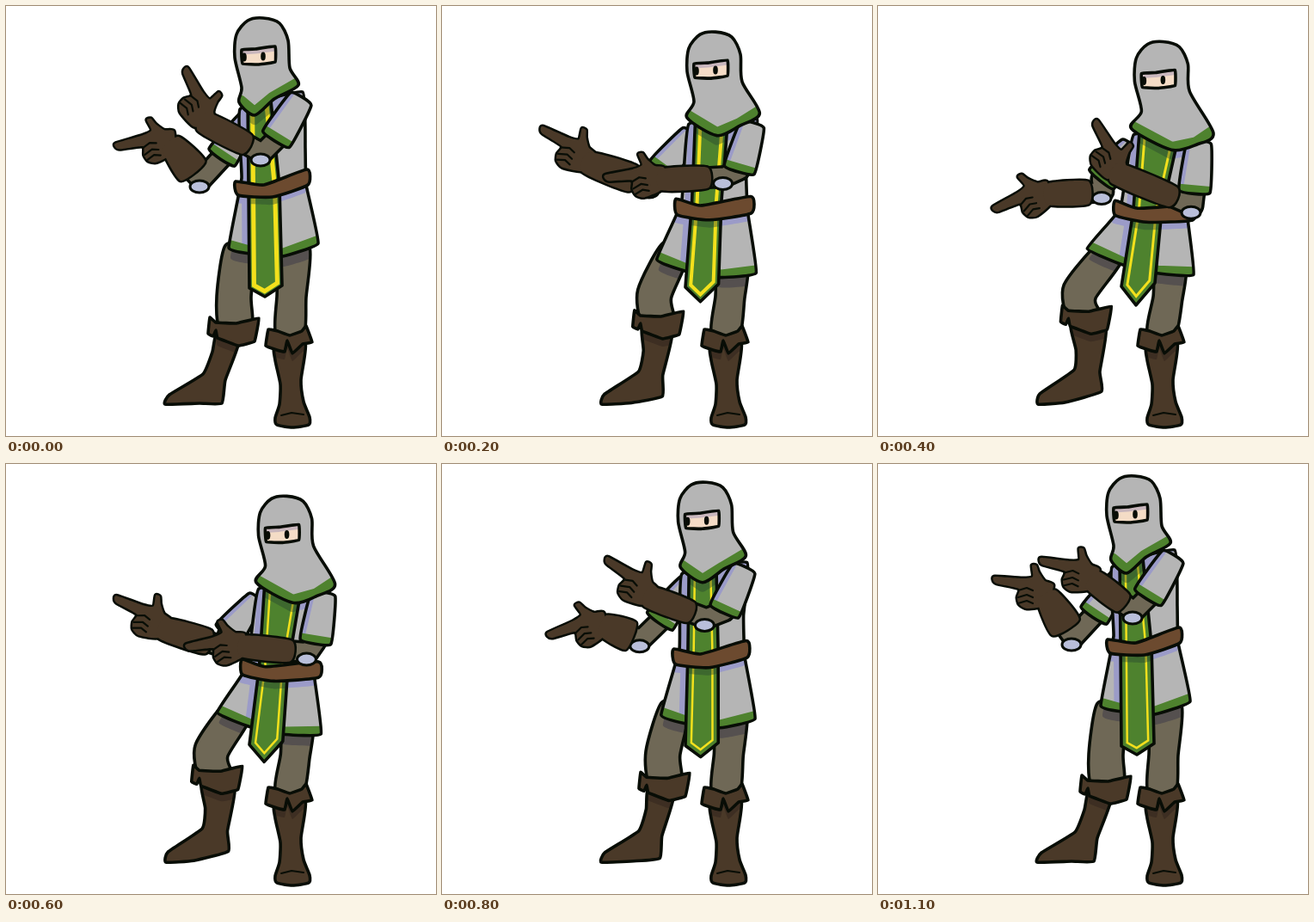
An HTML page with a canvas that plays this animation: 500x500 px, repeating every 1.2 s.

```html
<!DOCTYPE html>
<html lang="en">
<head>
<meta charset="utf-8">
<title>Knight dance</title>
<style>
html, body { margin: 0; width: 100%; height: 100%; overflow: hidden; background: #fff; }
canvas { display: block; width: 100vw; height: 100vh; }
</style>
</head>
<body>
<canvas id="stage" width="500" height="500"></canvas>
<script>
const ctx = document.getElementById('stage').getContext('2d');
const INK = '#080d06', STEEL = '#b5b5b5', LILAC = '#9b9bc8', GREEN = '#4e822e', YELLOW = '#f3e01c',
  LEATHER = '#4a3928', DARK_LEATHER = '#3d2e22', CLOTH = '#6f6856', DARK_CLOTH = '#55504f',
  BELT = '#6c4a2f', PAD = '#b9bfda', SKIN = '#f4dcc6', SHADE = 'rgba(35,65,45,.4)';

const points = text => text.split(' ').map(p => p.split(',').map(Number));
const mix = (a, b, f) => Array.isArray(a) ? a.map((v, i) => mix(v, b[i], f)) : a + (b - a) * f;
const shift = (pts, dx, dy) => pts.map(([x, y]) => [x + dx, y + dy]);

// Each moving part blends between standing and crouching
const pair = (stand, crouch) => {
  const a = points(stand), b = points(crouch);
  return f => mix(a, b, f);
};
const collarAt = pair('340,92 312,108 289,127 271,112', '391,149 372,162 342,168 295,143');
const tunicAt = pair(
  '272,120 274,200 259,281 284,288 322,291 363,276 349,208 348,165 345,100',
  '298,150 282,235 243,281 284,300 325,310 367,312 360,245 358,200 382,155');
const tabardAt = pair('281,108 307,100 318,210 321,325 301,338 283,328 282,210',
  '305,140 352,145 330,240 322,322 300,348 283,326 297,240');
const beltAt = pair('267,204 300,208 350,190 351,208 310,222 270,220',
  '276,226 302,235 366,232 366,249 312,251 276,243');
const bootAt = pair('245,380 240,402 229,428 190,452 185,463 225,462 251,462 255,435 271,390',
  '224,370 230,400 228,423 188,451 186,463 217,461 260,448 258,425 265,374');
const farLegAt = pair('271,280 265,338 267,374', '272,284 234,332 239,360');
const nearLegAt = pair('336,280 332,338 330,382', '341,298 337,340 329,382');
const farSleeveAt = pair('283,128 251,176', '292,162 260,202');
const nearSleeveAt = pair('343,108 314,155', '374,160 369,217');
const padsAt = pair('225,210 296,179', '261,224 366,242');

// Wrist x, y and hand angle on each beat; one step is 100 ms
const beats = [
  { at: 0, far: [188, 161, -20], near: [226, 131, 55] },
  { at: 2, far: [163, 180, 20], near: [250, 203, -15] },
  { at: 4, far: [193, 221, -33], near: [273, 191, 52] },
  { at: 6, far: [177, 190, 16], near: [270, 213, -18] },
  { at: 8, far: [183, 189, -28], near: [235, 152, 25] },
  { at: 9, far: [181, 164, 6], near: [233, 141, -4] },
  { at: 11, far: [192, 153, 0], near: [245, 134, 3] }];

const dome = points('274,95 266,60 268,33 281,17 299,14 318,20 328,40 330,72');
const slot = points('274,51 290,50 313,47 313,65 294,68 275,67');
const handShape = points('12,-12 2,-17 -5,-27 -8,-35 -13,-35 -12,-22 -24,-20 -56,-22 -58,-18 -54,-14 -28,-8 -30,2 -28,10 -19,15 4,11');
const farCuff = points('244,368 237,362 235,381 241,384 244,377 246,386 270,395 289,390 294,363 268,369');
const nearCuff = points('305,376 302,395 315,400 324,402 327,389 333,404 345,393 356,391 349,372 344,378 330,383 316,378');
const nearBoot = points('313,396 313,412 319,440 318,463 313,479 315,487 333,490 352,487 353,478 346,460 343,435 348,390');

function trace(pts, bend) {
  const n = pts.length, at = i => pts[(i + n) % n];
  ctx.beginPath();
  ctx.moveTo(...pts[0]);
  for (let i = 0; i < n; i++) {
    const [a, b, c, d] = [at(i - 1), at(i), at(i + 1), at(i + 2)];
    ctx.bezierCurveTo(b[0] + (c[0] - a[0]) * bend, b[1] + (c[1] - a[1]) * bend,
      c[0] - (d[0] - b[0]) * bend, c[1] - (d[1] - b[1]) * bend, ...c);
  }
  ctx.closePath();
}
function blot(pts, color, bend = .05) {
  trace(pts, bend);
  ctx.fillStyle = color;
  ctx.fill();
}
function stroke(color = INK, width = 3.6) {
  ctx.strokeStyle = color;
  ctx.lineWidth = width;
  ctx.stroke();
}
function line(pts, color, width) {
  ctx.beginPath();
  pts.forEach(p => ctx.lineTo(...p));
  stroke(color, width);
}
// Filled shape with clipped inner details and an ink outline on top
function part(pts, color, bend = .05, details) {
  blot(pts, color, bend);
  if (details) {
    ctx.save();
    ctx.clip();
    details();
    ctx.restore();
  }
  trace(pts, bend);
  stroke();
}
function oval([x, y], rx, ry, color) {
  ctx.beginPath();
  ctx.ellipse(x, y, rx, ry, 0, 0, 7);
  ctx.fillStyle = color;
  ctx.fill();
}

// Outline around a chain of joints, given half the width at each joint
function limb(joints, halves) {
  const left = [], right = [];
  joints.forEach(([x, y], i) => {
    const a = joints[Math.max(i - 1, 0)], b = joints[Math.min(i + 1, joints.length - 1)];
    const dx = b[0] - a[0], dy = b[1] - a[1], k = halves[i] / Math.hypot(dx, dy);
    left.push([x + dy * k, y - dx * k]);
    right.unshift([x - dy * k, y + dx * k]);
  });
  return [...left, ...right];
}
function sleeve(joints, halves) {
  const pts = limb(joints, halves);
  part(pts, STEEL, .06, () => {
    line(pts.slice(2), LILAC, 9);
    line(pts.slice(1, 3), GREEN, 15);
  });
}
const elbowOf = ([x, y]) => [x + 2, y - 8];

function forearm(hem, pad, [x, y]) {
  const elbow = elbowOf(pad), bone = [hem, elbow, mix(elbow, [x, y], .3)];
  line(bone, INK, 27);
  line(bone, CLOTH, 20);
}
function glove(pad, [x, y, angle], cuffHalf) {
  oval(pad, 11, 7, PAD);
  stroke(INK, 3);
  const a = angle * Math.PI / 180, c = Math.cos(a), s = Math.sin(a);
  const place = pts => pts.map(([u, v]) => [x + u * c - v * s, y + u * s + v * c]);
  const hand = place(handShape);
  const gauntlet = limb([place([[4, 0]])[0], mix(elbowOf(pad), [x, y], .25)], [12, cuffHalf]);
  for (const pts of [hand, gauntlet]) {
    trace(pts, .1);
    stroke(INK, 5);
  }
  blot(hand, LEATHER, .1);
  blot(gauntlet, LEATHER, .1);
  for (const v of [-6, 2, 9]) line(place([[-29, v], [-19, v - 3], [-12, v]]), INK, 2.2);
}

function armsAt(step) {
  const i = beats.findLastIndex(b => b.at <= step), a = beats[i], b = beats[i + 1] || a;
  const f = a === b ? 0 : (step - a.at) / (b.at - a.at);
  return [mix(a.far, b.far, f), mix(a.near, b.near, f)];
}

function draw(step) {
  // One dip of the knees takes nine steps, then a rest
  const dip = step < 9 ? Math.sin(Math.PI * step / 9) ** 1.25 : 0;
  const swing = 4 * dip * (1 - dip);
  const sag = pts => pts.map(([x, y]) =>
    [x, y + 14 * swing * Math.min(1, Math.max(0, (y - 150) / 120))]);
  const headShift = [33 * dip, 28 * dip];

  const collar = collarAt(dip), tunic = sag(tunicAt(dip)), belt = sag(beltAt(dip)), tabard = tabardAt(dip);
  const farSleeve = farSleeveAt(dip), nearSleeve = nearSleeveAt(dip);
  const [farPad, nearPad] = padsAt(dip ** 1.5), [far, near] = armsAt(step);
  const cuff = shift(farCuff, -23 * dip, -14 * dip);

  ctx.fillStyle = '#fff';
  ctx.fillRect(0, 0, 500, 500);
  ctx.lineJoin = ctx.lineCap = 'round';

  const hemShade = () => blot(shift(tunic, 2, 12), DARK_CLOTH);
  part(limb(farLegAt(dip), [16, 20, 18]), CLOTH, .12, hemShade);
  part(limb(nearLegAt(dip), [17, 17, 16]), CLOTH, .12, hemShade);
  part(bootAt(dip), LEATHER, .07, () => blot(shift(cuff, 0, 9), DARK_LEATHER));
  part(cuff, LEATHER, .03);
  part(nearBoot, LEATHER, .1, () => blot(shift(nearCuff, 0, 9), DARK_LEATHER));
  line([[320, 476], [332, 473], [346, 475]], INK, 2);
  part(nearCuff, LEATHER, .03);

  forearm(farSleeve[1], farPad, far);
  sleeve(farSleeve, [10, 18]);

  part(tunic, STEEL, .05, () => {
    line(shift(collar, 0, 5), LILAC, 12);
    blot(shift(tabard, -8, 0), LILAC, 0);
    blot(shift(belt, -3, 9), LILAC);
    line(tunic.slice(2, 6), GREEN, 18);
  });

  part(tabard, GREEN, 0, () => {
    trace(tabard, 0);
    stroke(YELLOW, 16);
    stroke(GREEN, Math.min(11, 6 + step)); // the trim thins out
    blot(shift(belt, 0, 9), SHADE);
    line(shift(collar, 0, 5), SHADE, 12);
  });
  part(belt, BELT, .09);

  forearm(nearSleeve[1], nearPad, near);
  sleeve(nearSleeve, [14, 18]);

  part([...shift(dome, ...headShift), ...collar], STEEL, .14, () => line(collar, GREEN, 18));
  const face = shift(slot, ...headShift);
  part(face, SKIN, .04, () => line(face.slice(0, 3), '#c9b7bd', 11));
  for (const eye of shift([[277, 59.5], [299, 58.5]], ...headShift)) oval(eye, 2.8, 5, INK);

  glove(farPad, far, 18 - 5 * dip);
  glove(nearPad, near, 12);
}

const start = performance.now();
function tick() {
  draw(Math.floor((performance.now() - start) / 100) % 12);
  requestAnimationFrame(tick);
}
tick();
</script>
</body>
</html>
```
